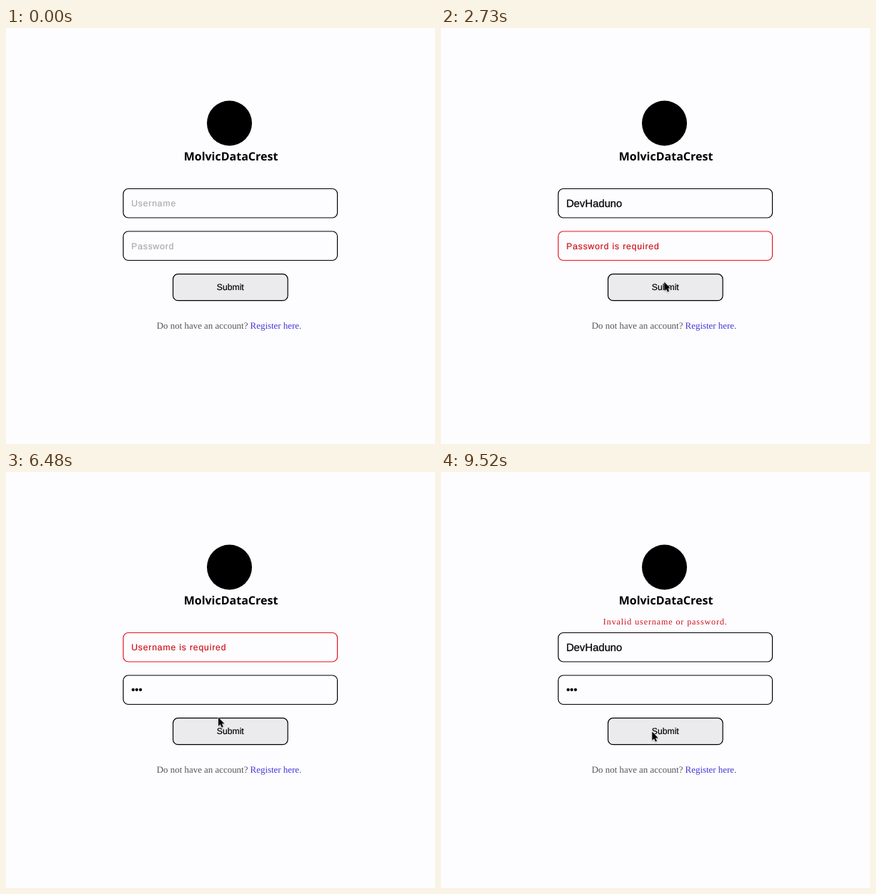
Animation, 600 px wide and 581 px high, one loop 9.79 s. Source, as an HTML page:

```html
<!DOCTYPE html>
<html lang="en">
<head>
<meta charset="utf-8">
<title>Login form</title>
<style>
  html, body { margin: 0; width: 100%; height: 100%; overflow: hidden; background: #fdfcff; }
  svg { display: block; font-family: "Liberation Sans", Arial, sans-serif; text-rendering: geometricPrecision; }
  .box { fill: none; stroke: #000; stroke-width: 1.2; }
  .hint { font-size: 12.2px; letter-spacing: .83px; fill: #a9a8ab; stroke: #a9a8ab; stroke-width: .2; }
  .error .box { stroke: #e5161b; }
  .error .hint { fill: #cc1319; stroke: #cc1319; }
  .value { font-size: 14.8px; stroke: #000; stroke-width: .25; }
  .caret { fill: none; stroke: #000; }
  .selection { fill: #b4d5fe; }
  .serif { font-family: "Liberation Serif", Times, serif; }
</style>
</head>
<body>
<svg width="600" height="581" viewBox="0 0 600 581">
  <circle cx="312.5" cy="133" r="31.5"/>
  <text x="314.5" y="185" text-anchor="middle" font-family="Open Sans, sans-serif" font-weight="700" font-size="16">MolvicDataCrest</text>
  <text id="message" class="serif" x="226.8" y="213" font-size="12" letter-spacing=".92" fill="#cc1319">Invalid username or password.</text>
  <g id="form"></g>
  <rect class="box" x="233.6" y="343.7" width="160.5" height="37" rx="7" style="fill:#ebeaec"/>
  <text x="313.8" y="366" text-anchor="middle" font-size="12.2" stroke="#000" stroke-width=".2">Submit</text>
  <text class="serif" x="210.8" y="420.3" font-size="12.92" fill="#555459">Do not have an account? <tspan fill="#4438d6">Register here</tspan>.</text>
  <g id="pointer">
    <path id="arrow" transform="translate(.3 .8) scale(.88)" d="M0 0V13.5L3.1 10.7 5.3 15.6 7.6 14.6 5.4 9.8H9.6Z" stroke="#fff" paint-order="stroke" style="filter:drop-shadow(0 1px 1px #0004)"/>
    <path id="beam" d="M-3-8Q0-8 0-6V6Q0 8-3 8M3-8Q0-8 0-6V6Q0 8 3 8M-1.5 1H1.5" fill="none" stroke="#222"/>
  </g>
</svg>
<script>
const LOOP = 9790, SHAKE = 300, BLINK = 530, REPLY = 130;
const FIELD = { x: 164, width: 299.5, height: 40.5, text: 175.2 };
const tops = { Username: 224.5, Password: 284 };
const names = Object.keys(tops);

const $ = id => document.getElementById(id);
const show = (el, on) => el.setAttribute('visibility', on ? 'visible' : 'hidden');
const shift = (el, x, y = 0) => el.setAttribute('transform', `translate(${x} ${y})`);
const smooth = p => p * p * (3 - 2 * p);

$('form').innerHTML = names.map(name => `
  <g id="${name}">
    <rect class="box" x="${FIELD.x}" width="${FIELD.width}" height="${FIELD.height}" rx="7"/>
    <rect class="selection" x="176" y="11.5" height="18"/>
    <text class="hint" x="${FIELD.text}" y="24.8"></text>
    <text class="value" x="${FIELD.text}" y="25.1"></text>
    <path class="caret" d="M0 12.5v16"/>
  </g>`).join('');

// Left, right, left, back to rest
function shake(age) {
  const p = age / SHAKE * 4, i = Math.floor(p);
  if (p < 0 || p >= 4) return 0;
  const stop = n => n % 4 ? 5 * (-1) ** n : 0;
  return stop(i) + (stop(i + 1) - stop(i)) * smooth(p - i);
}

// Each action changes the state, given the time since it began
const move = (x, y, duration) => (state, age) => {
  const k = smooth(Math.min(1, age / duration));
  state.x += (x - state.x) * k * k;
  state.y += (y - state.y) * k;
  state.pointer = true;
};
const focus = name => (state, age) => Object.assign(state, { focus: name, blink: age });
const select = name => state => { state.selected = name; };
const hidePointer = state => { state.pointer = false; };
const type = (name, value) => (state, age) => {
  Object.assign(state[name], { value, hint: '' });
  Object.assign(state, { focus: name, blink: age, selected: null, pointer: false });
};
const submit = (state, age) => {
  state.focus = null;
  for (const name of names) {
    const field = state[name], empty = !field.value;
    if (empty && !field.error) field.dx = shake(age);
    if (empty) field.hint = name + ' is required';
    field.error = empty;
  }
  if (names.every(name => state[name].value)) state.reply = age - REPLY;
};

const script = [
  [30, move(440, 360, 240)],
  [420, move(348, 359, 310)],
  [910, submit],
  [1300, move(335, 245, 550)],
  [1830, focus('Username')],
  [2090, type('Username', 'DevHaduno')],
  [2330, move(312, 354, 310)],
  [2640, submit],
  [3090, move(334, 303, 300)],
  [3380, focus('Password')],
  [3745, type('Password', '•••')],
  [3940, move(363, 250, 540)],
  [4880, select('Username')],
  [5075, type('Username', '')],
  [5390, move(296, 362, 310)],
  [5960, submit],
  [6350, move(322, 245, 500)],
  [6900, focus('Username')],
  [7000, hidePointer],
  [7480, type('Username', 'DevHaduno')],
  [7640, move(295, 362, 560)],
  [8300, submit]
];

function stateAt(t) {
  const state = { x: 512, y: 570, pointer: false, reply: -1 };
  for (const name of names) state[name] = { value: '', hint: name, error: false, dx: 0 };
  for (const [start, act] of script) if (t >= start) act(state, t - start);
  return state;
}

function drawField(name, state) {
  const field = state[name], group = $(name), part = key => group.querySelector('.' + key);
  group.setAttribute('class', field.error ? 'error' : '');
  shift(group, field.dx, tops[name]);
  part('hint').textContent = field.hint;
  part('value').textContent = field.value;
  const length = part('value').getComputedTextLength();
  part('selection').setAttribute('width', length);
  show(part('selection'), state.selected === name);
  shift(part('caret'), FIELD.text + length + 1.3);
  show(part('caret'), state.focus === name && state.selected !== name && state.blink % (2 * BLINK) < BLINK);
}

function drawPointer({ x, y, pointer }) {
  const overField = x > FIELD.x && x < FIELD.x + FIELD.width &&
    names.some(name => y > tops[name] && y < tops[name] + FIELD.height);
  shift($('pointer'), x, y);
  show($('arrow'), pointer && !overField);
  show($('beam'), pointer && overField);
}

function draw() {
  const state = stateAt(performance.now() % LOOP);
  for (const name of names) drawField(name, state);
  show($('message'), state.reply >= 0);
  shift($('message'), shake(state.reply));
  drawPointer(state);
  requestAnimationFrame(draw);
}
draw();
</script>
</body>
</html>
```
